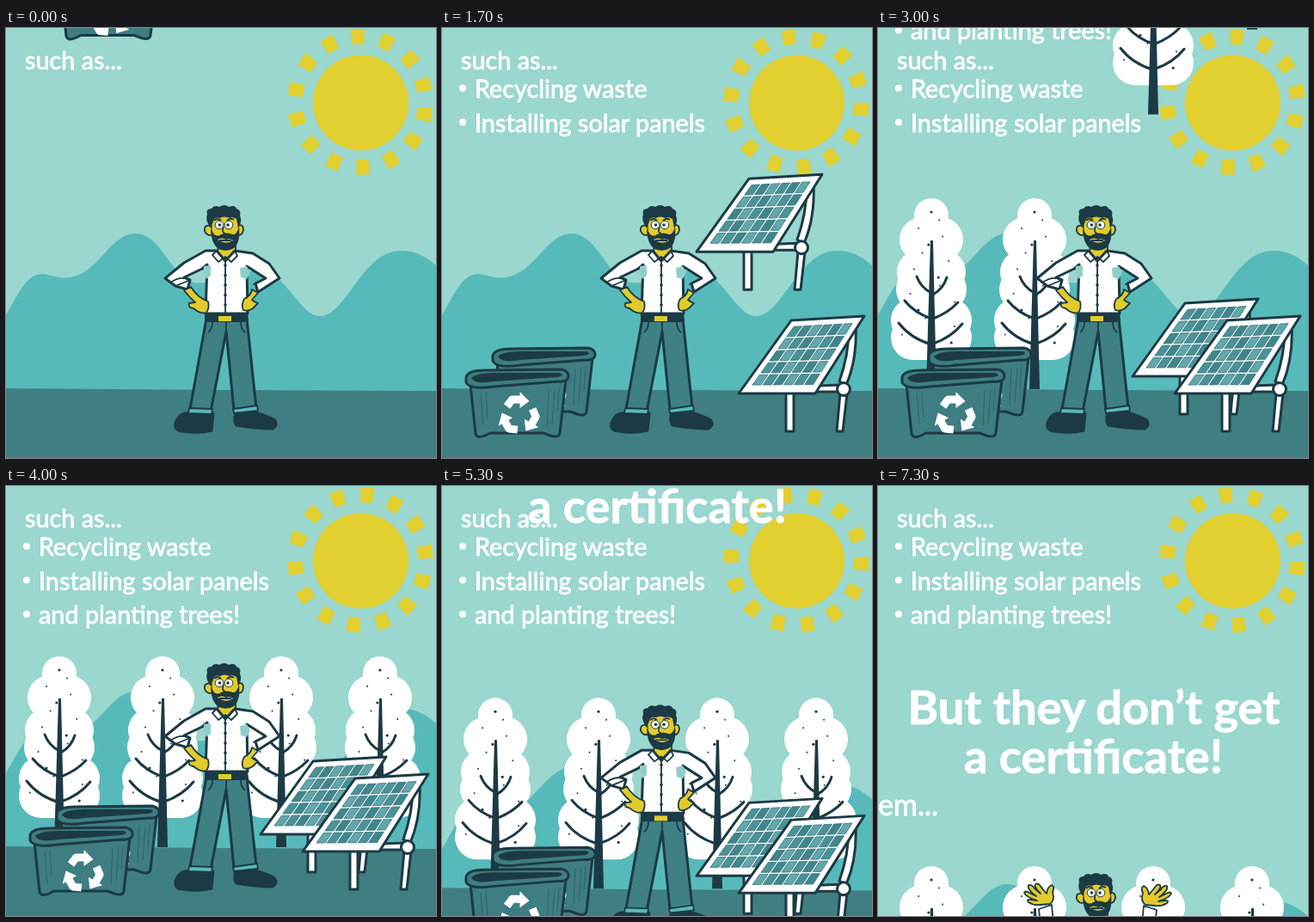
An HTML page that plays this animation: 500x500 px, repeating every 7400 ms.

```html
<!DOCTYPE html>
<html lang="en">
<head>
<meta charset="utf-8">
<style>
  html, body { margin: 0; width: 100%; height: 100%; overflow: hidden; background: #9ad7ce; }
  svg { display: block; width: 100vw; height: 100vh; }
  text { font-family: Lato, "Open Sans", sans-serif; font-size: 28.8px; fill: #fff; stroke: #fff; stroke-width: .8px; }
  .big { font-size: 54.3px; font-weight: 700; text-anchor: middle; }
  .ink { stroke: #1c3a45; stroke-width: 3; stroke-linejoin: round; stroke-linecap: round; }
  .white { fill: #fff; }
  .dark { fill: #1c3a45; }
  .skin { fill: #e2cb2b; }
  .denim { fill: #3f8085; }
  .line { fill: none; }
  .thin { stroke-width: 1.8; }
</style>
</head>
<body>
<svg viewBox="0 0 500 500">
  <defs>
    <g id="arrow" class="white">
      <path d="M-14-10L-8-18H2" fill="none" stroke="#fff" stroke-width="9" stroke-linejoin="round"/>
      <path d="M1-27V-8L12-16Z"/>
    </g>
    <g id="bin">
      <path class="ink" fill="#3e7d81" d="M33 414L39 472Q41 478 50 474L56 471H118L126 474Q136 477 137 471L144 409Z"/>
      <path class="line" stroke="#2d626a" d="M45 424l3 38M51 423l2 30M124 421l-2 42M131 420l-3 40M136 418l-2 28"/>
      <path class="ink" fill="#3e7d81" d="M28 406Q30 398 50 398L139 397Q148 399 147 406Q145 412 135 411L60 417Q32 421 28 412Z"/>
      <path class="dark" d="M34 407Q40 401 60 401L137 401Q144 404 134 406L60 411Q38 415 34 407Z"/>
      <g transform="translate(89.500 450)">
        <use href="#arrow"/><use href="#arrow" transform="rotate(120)"/><use href="#arrow" transform="rotate(240)"/>
      </g>
    </g>
    <g id="tree">
      <g id="leaves" class="white"></g>
      <path class="dark" d="M-6 420L-1 247H2L6 420Z"/>
      <path class="ink line" d="M0 308Q-12 302 -17 289M2 310Q14 303 18 290M0 338Q-20 331 -31 317M2 338Q20 331 31 319M0 368Q-24 361 -38 343M2 367Q23 360 36 344"/>
      <g id="specks" class="dark"></g>
    </g>
    <g id="panel">
      <path class="ink white" d="M400 422V469H409V422ZM437 416L462 415V423L434 423ZM481 345Q483 385 470 415L462 411Q473 380 473 350ZM463 424L459 469H466L471 425Z"/>
      <circle class="ink white" cx="467" cy="420" r="7.5"/>
      <path class="ink white" d="M406 340L491 335L434 425H345Z"/>
      <g id="cells"></g>
    </g>
    <g id="hand">
      <path class="ink white thin" d="M187 248L202 243L205 275H190Z"/>
      <path class="ink skin thin" d="M189 243Q181 244 175 240Q172 236 178 237L185 238Q172 234 170 229Q171 226 176 229L184 233Q173 225 175 220Q179 219 182 224L189 230Q181 222 183 219Q187 217 190 223L196 230Q197 222 202 220Q206 222 203 228Q206 238 200 242Z"/>
    </g>
  </defs>

  <path id="hills" fill="#57baba" d="M0 334C16 306 24 286 43 286C58 288 64 294 82 288C108 280 124 239 150 239C182 239 192 292 220 296C250 300 285 270 312 288C334 304 346 335 365 335C396 335 414 259 459 259C478 259 488 266 500 276V520H0Z"/>

  <g fill="#e2cf30" transform="translate(412 86)">
    <g id="rays"></g>
    <circle cx=".5" cy="1" r="55.5"/>
  </g>

  <g id="scene">
    <path fill="#3f7f82" d="M0 419L250 421L500 422V520H0Z"/>
    <g id="trees"></g>
    <g id="panelBack"><use href="#panel" x="-49" y="-20"/></g>
    <g id="panelFront"><use href="#panel"/></g>
    <g id="binBack"><use href="#bin" x="31" y="-25"/></g>
    <g id="binFront"><use href="#bin"/></g>
    <g id="hands"><use href="#hand"/><use href="#hand" transform="matrix(-1 0 0 1 511 1)"/></g>
    <g id="man">
      <path class="ink dark" d="M213 448Q202 446 197 459Q195 469 206 469Q224 472 239 468L241 448ZM267 447Q264 458 268 462Q290 466 310 466Q318 460 311 455Q303 451 290 447Z"/>
      <path class="ink denim" d="M233 338L214 443L238 446L256 353L265 444L291 442L280 338Z"/>
      <path class="ink thin" fill="#58b9ba" d="M213 442L240 443L239 449L212 448ZM264 443L292 439L293 445L265 448Z"/>
      <path class="line thin" stroke="#1c3a45" d="M256 342V354M240 342Q240 350 235 354M273 342Q273 350 278 354"/>
      <path class="dark" d="M231 331H281L282 342H231Z"/>
      <rect class="skin" x="247" y="335" width="15" height="6"/>
      <path class="ink skin thin" d="M247 248H267V264L257 270L246 263Z"/>
      <path class="ink white" d="M232 259L207 273L185 291L197 300L211 304L214 293L207 290L228 280L234 275L232 332H281L280 277L302 291L290 297L293 307L318 291L306 274L287 262L266 259L255 271L245 259Z"/>
      <path fill="#8fcfc9" d="M230 277L238 276L238 288L233 292L230 284ZM272 279L280 277L284 284L280 292L273 290Z"/>
      <path class="ink line thin" d="M245 259L240 264L247 272L255 266L262 272L269 265L266 259M255 268V331M191 296Q200 290 207 291M214 293L197 300M288 298L302 291"/>
      <g id="buttons" class="dark"></g>
      <path class="ink skin thin" d="M207 305L215 301Q222 313 235 318Q237 325 233 331Q226 333 218 326Q211 325 213 320L220 319Q213 313 207 305ZM293 308L286 304Q285 311 277 315Q273 322 276 328Q281 330 287 326L293 320Q288 318 286 316Z"/>
      <path class="ink skin thin" d="M239 230Q230 228 231 236Q234 243 241 240ZM269 230Q276 227 276 235Q274 243 268 240Z"/>
      <path class="skin" d="M239 215H271V243Q266 258 256 258Q244 257 240 243Z"/>
      <path class="dark" d="M238 233L242 240Q247 243 250 240Q257 237 264 240Q268 241 271 231Q273 249 265 256Q257 261 247 257Q238 250 238 233Z"/>
      <path class="skin" d="M246 246Q251 243 256 246Q260 244 264 247Q256 253 246 246Z"/>
      <path class="line thin" stroke="#1c3a45" d="M248 247H262M253 231Q250 238 255 239M242 224Q246 220 250 224M257 224Q261 220 265 223"/>
      <path class="dark" d="M238 233Q231 223 234 217Q232 210 239 210Q242 205 248 208Q254 204 259 208Q266 205 268 210Q274 212 272 218Q275 225 270 233L268 222Q263 219 260 221Q253 218 249 221Q242 219 241 225Z"/>
      <g class="white" stroke="#1c3a45"><circle cx="248" cy="229" r="4.8"/><circle cx="259" cy="229" r="4.8"/></g>
      <g class="dark"><circle cx="248.5" cy="229" r="1.8"/><circle cx="258" cy="229" r="1.8"/></g>
    </g>
  </g>

  <text x="22" y="48">such as...</text>
  <g id="lines"></g>
  <g id="headline"><text class="big" x="251" y="277">But they don’t get</text><text class="big" x="250.500" y="334">a certificate!</text></g>
  <text id="ending" y="383" text-anchor="end" style="font-size:34px">for them...</text>
</svg>
<script>
const LOOP = 7400, STEP = 100, FALL = 600, RAYS = 14;
const $ = id => document.getElementById(id);
const ease = p => { p = Math.min(1, Math.max(0, p)); return p * p * (3 - 2 * p); };
const shift = (el, y) => el.setAttribute('transform', `translate(0 ${y})`);
const fill = (id, items, draw) => { $(id).innerHTML = items.map(draw).join(''); };
const range = n => [...Array(n).keys()];

// Foliage: each tier is a height and a half-width, rounded at both ends.
const tiers = [[218, 20], [246, 37], [284, 40], [304, 41], [340, 47], [360, 47]];
fill('leaves', tiers, ([y, w], i) => {
  const r = i ? 26 : 20;
  return `<rect x="${-w}" y="${y - r}" width="${2 * w}" height="${2 * r}" rx="${r}"/>`;
});
fill('specks', range(17), i => {
  const y = 214 + i * 9.5, x = Math.sin(i * 2.4) * (12 + i * 1.5);
  return `<circle cx="${x}" cy="${y}" r="${i % 4 ? 1 : 1.6}"/>`;
});
fill('buttons', range(5), i => `<circle cx="255" cy="${276 + i * 11.5}" r="1.8"/>`);
fill('rays', range(RAYS), i =>
  `<path d="M-7-67L-8.5-84L7.5-85L7-67Z" transform="rotate(${i * 360 / RAYS})"/>`);

const onPanel = (u, v) => `${406 + 85 * u - 61 * v + 4 * u * v} ${340 - 5 * u + 85 * v + 5 * u * v}`;
fill('cells', range(30), i => {
  const u = .1 + (i % 6) * .137, v = .09 + Math.floor(i / 6) * .164, w = .112, h = .138;
  const corners = [[u, v], [u + w, v], [u + w, v + h], [u, v + h]].map(c => onPanel(...c));
  return `<path d="M${corners.join('L')}Z" fill="${['#4b9298', '#62a7ab', '#3f868b'][(i * 2 + Math.floor(i / 6)) % 3]}" stroke="#35757c" stroke-width=".8"/>`;
});

fill('trees', [62, 182, 320, 435], x => `<g><use href="#tree" x="${x}"/></g>`);
fill('lines', ['Recycling waste', 'Installing solar panels', 'and planting trees!'], (line, i) => {
  const y = 81 + i * 39.5;
  return `<g><circle cx="24" cy="${y - 11}" r="4" fill="#fff"/><text x="38" y="${y}">${line}</text></g>`;
});

// [element, start time, fall height]
const drops = [
  [$('binBack'), -110, 480], [$('binFront'), 190, 480],
  [$('panelFront'), 950, 475], [$('panelBack'), 1320, 475],
  ...[2150, 2330, 2805, 2955].map((t, i) => [$('trees').children[i], t, 425]),
  ...[60, 1000, 2860].map((t, i) => [$('lines').children[i], t, [95, 135, 170][i]])
];

function draw(now) {
  const t = Math.floor(now % LOOP / STEP) * STEP;
  for (const [el, start, height] of drops) shift(el, -height * (1 - ease((t - start) / FALL)));

  const slide = ease((t - 5100) / 700);
  shift($('scene'), 244 * slide);
  shift($('headline'), -363 * (1 - slide));
  shift($('hills'), 224 * ease((t - 5000) / 700));

  shift($('hands'), 45 * (1 - ease((t - 6900) / 300)));
  $('hands').setAttribute('visibility', t < 6900 ? 'hidden' : 'visible');
  $('ending').setAttribute('x', t < 7100 ? -20 : 70 * ((t - 7080) / 220) ** 2);
  $('rays').setAttribute('transform', `rotate(${t * .0277 - 2})`);
  requestAnimationFrame(() => draw(performance.now()));
}
draw(0);
</script>
</body>
</html>
```
